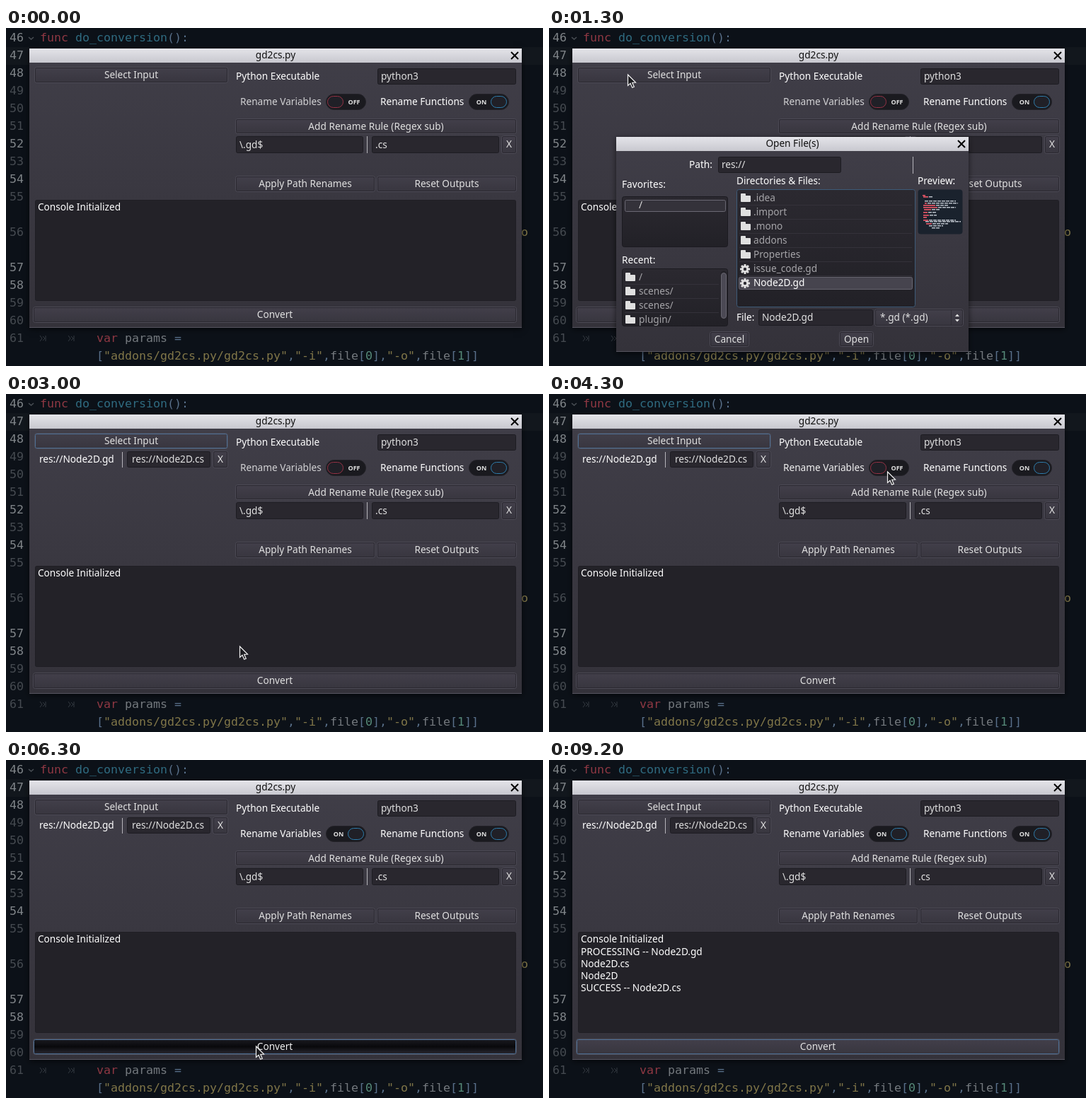
An HTML page with a canvas for the animation above (9.8 s loop, 759 px wide and 478 px high).

```html
<!DOCTYPE html>
<html lang="en">
<head>
<meta charset="utf-8">
<style>
html, body { margin: 0; width: 100%; height: 100%; overflow: hidden; background: #0c1118; }
canvas { display: block; }
</style>
</head>
<body>
<canvas id="stage" width="759" height="478"></canvas>
<script>
const ctx = document.getElementById('stage').getContext('2d');
const LOOP = 9800, STEP = 100;
const UI = '13.65px "Noto Sans", sans-serif';
const CODE = '16.61px "DejaVu Sans Mono", monospace';
const BLUE = '#4d6f94';
const WHITE = '#fff', LIGHT = '#e0e0e0', GREY = '#a5a4a8';

// Pointer keys: time, x, y. It is hidden outside the first and last key.
const PATH = [
  [600, 150, 4], [1000, 112, 66], [1500, 112, 66], [2300, 331, 357],
  [3300, 331, 357], [4300, 479, 110], [5000, 479, 110], [5200, 471, 133],
  [5300, 471, 133], [5600, 396, 317], [5700, 396, 317], [6000, 354, 405],
  [8800, 354, 405], [9100, 290, 70]
];
let pointer = null, modal = false;

function pointerAt(t) {
  const next = PATH.findIndex(key => key[0] >= t);
  if (next < 0 || t < PATH[0][0]) return null;
  const [t1, x1, y1] = PATH[next], [t0, x0, y0] = PATH[Math.max(0, next - 1)];
  const p = t1 > t0 ? (t - t0) / (t1 - t0) : 1;
  const e = p * p * (3 - 2 * p);
  return { x: Math.round(x0 + (x1 - x0) * e), y: Math.round(y0 + (y1 - y0) * e) };
}

const hovered = (x, y, w, h) => pointer && !modal &&
  pointer.x >= x && pointer.x < x + w && pointer.y >= y && pointer.y < y + h;

function text(str, x, middle, color = WHITE, align = 'left', font = UI) {
  ctx.font = font;
  ctx.textAlign = align;
  ctx.fillStyle = color;
  ctx.fillText(str, x, Math.round(middle + 5));
}

function rect(x, y, w, h, fill) {
  ctx.fillStyle = fill;
  ctx.fillRect(x, y, w, h);
}

function fade(y, h, ...colors) {
  const g = ctx.createLinearGradient(0, y, 0, y + h);
  colors.forEach((c, i) => g.addColorStop(i / (colors.length - 1), c));
  return g;
}

function box(x, y, w, h, fill, stroke, r = 2) {
  ctx.beginPath();
  ctx.roundRect(x + .5, y + .5, w - 1, h - 1, r);
  if (fill) { ctx.fillStyle = fill; ctx.fill(); }
  if (stroke) { ctx.strokeStyle = stroke; ctx.lineWidth = 1; ctx.stroke(); }
}

function lines(color, width, ...paths) {
  ctx.strokeStyle = color;
  ctx.lineWidth = width;
  ctx.beginPath();
  for (const path of paths)
    path.forEach(([x, y], i) => i ? ctx.lineTo(x, y) : ctx.moveTo(x, y));
  ctx.stroke();
}

function button(label, x, y, w, h, { focus, pressed } = {}) {
  const hover = hovered(x, y, w, h);
  const fill = pressed ? fade(y, h, '#1a1a20', '#09090c', '#2a2932')
    : hover ? fade(y, h, '#4e4c58', '#413f49') : fade(y, h, '#423f4a', '#38363f');
  box(x - 1, y - 1, w + 2, h + 2, null, '#4d4b56', 3);
  box(x, y, w, h, fill, focus ? BLUE : '#2a2830');
  text(label, x + w / 2, y + h / 2 - (h > 22 ? 1 : .5), hover ? '#f0f0f0' : LIGHT, 'center');
}

function field(str, x, y, w, h, pad = 5) {
  box(x, y, w, h, '#29272e', '#1d1c22');
  text(str, x + pad, y + h / 2 - .5, LIGHT);
}

function panel(x, y, w, h, stroke = '#1b1a20') {
  box(x, y, w, h, fade(y, h, '#2b2930', '#222127'), stroke, 3);
}

function toggle(x, on) {
  box(x, 93, 57, 23, '#1a1a1f', '#222127', 11);
  box(on ? x + 31 : x + 2, 96, 23, 17, '#202027', on ? '#2f7eae' : '#963245', 8);
  text(on ? 'ON' : 'OFF', on ? x + 18 : x + 40, 103, LIGHT, 'center', 'bold 9px "Noto Sans", sans-serif');
}

function frame(title, x, y, w, h) {
  ctx.save();
  ctx.shadowColor = 'rgba(0,0,0,.6)';
  ctx.shadowBlur = 8;
  ctx.shadowOffsetY = 2;
  rect(x, y, w, h, '#38363f');
  ctx.restore();
  rect(x, y, w, h, fade(y, h, '#403e48', '#3a3841', '#34323a'));
  rect(x, y + h - 1, w, 1, '#56545f');
  rect(x, y, w, 20, fade(y, 20, '#e4e4e9', '#c8c8cf'));
  text(title, x + w / 2, y + 9, '#111', 'center');
  const cx = x + w - 10, cy = y + 10;
  lines('#000', 2, [[cx - 5, cy - 5], [cx + 5, cy + 5]], [[cx + 5, cy - 5], [cx - 5, cy + 5]]);
}

function code(x, middle, ...parts) {
  for (const [str, color] of parts) {
    text(str, x, middle, color, 'left', CODE);
    x += str.length * 10;
  }
}

function editor() {
  const red = '#8f3843', plain = '#74797e', symbol = '#59708a', str = '#807648', num = '#568a78';
  rect(0, 0, 759, 478, '#0c1118');
  rect(0, 27, 759, 25, '#12171d');
  const bright = [46, 47, 48, 52, 54, 57, 58];
  for (let n = 46; n <= 61; n++) {
    const row = n - 46 + (n > 55) + (n > 56);
    code(5, 14 + row * 25, [String(n), bright.includes(n) ? '#7f8488' : '#454a50']);
  }
  lines('#4a4f55', 1.5, [[32, 13], [35.5, 16], [39, 13]]);
  code(48, 14, ['func ', red], ['do_conversion', '#2f6b80'], ['():', symbol]);
  code(728, 289, ['o', str]);
  for (const x of [48, 88])
    lines('#343a41', 1, [[x, 435], [x + 3, 439], [x, 443]], [[x + 4, 436], [x + 7, 439], [x + 4, 442]], [[x + 8, 435], [x + 8, 443]]);
  code(128, 439, ['var ', red], ['params ', plain], ['=', symbol]);
  code(128, 464, ['[', symbol], ['"addons/gd2cs.py/gd2cs.py"', str], [',', symbol], ['"-i"', str], [',', symbol],
    ['file', plain], ['[', symbol], ['0', num], ['],', symbol], ['"-o"', str], [',', symbol],
    ['file', plain], ['[', symbol], ['1', num], [']]', symbol]);
}

function converter(t) {
  const loaded = t >= 3000, renamed = t >= 4600, done = t >= 8000;
  frame('gd2cs.py', 33, 29, 696, 395);
  button('Select Input', 41, 56, 272, 21, { focus: t >= 3000 && t < 4500 });
  if (loaded) {
    text('res://Node2D.gd', 47, 92);
    rect(164, 82, 1, 22, '#b5b4ba');
    field('res://Node2D.cs', 171, 81, 118, 23, 7);
    button('X', 293, 81, 20, 23);
  }
  text('Python Executable', 325, 68);
  field('python3', 525, 57, 196, 23);
  const label = renamed ? WHITE : hovered(325, 85, 196, 39) ? '#f0f0f0' : '#d2d2d4';
  text('Rename Variables', 331, 104, label);
  toggle(452, renamed);
  if (t >= 4500 && t < 6200) box(325, 85, 196, 40, null, BLUE);
  text('Rename Functions', 529, 104);
  toggle(654, true);
  button('Add Rename Rule (Regex sub)', 325, 129, 396, 20);
  field('\\.gd$', 325, 153, 180, 24);
  rect(510, 153, 1, 24, '#b5b4ba');
  field('.cs', 517, 153, 180, 24);
  button('X', 701, 153, 20, 24);
  button('Apply Path Renames', 325, 210, 196, 21);
  button('Reset Outputs', 525, 210, 196, 21);
  box(41, 243, 680, 143, '#232228', '#1f1e24');
  text('Console Initialized', 45, 253);
  if (done) ['PROCESSING -- Node2D.gd', 'Node2D.cs', 'Node2D', 'SUCCESS -- Node2D.cs']
    .forEach((line, i) => text(line, 45, 271 + i * 17));
  button('Convert', 39, 395, 682, 21, { focus: t >= 6200, pressed: t >= 6300 && !done });
}

function folder(x, y) {
  ctx.fillStyle = LIGHT;
  ctx.beginPath();
  ctx.roundRect(x, y - 6, 7, 5, 1);
  ctx.roundRect(x, y - 3, 14, 9, 1);
  ctx.fill();
}

function gear(x, y) {
  for (let i = 0; i < 4; i++) {
    const dx = Math.cos(i * Math.PI / 4) * 7, dy = Math.sin(i * Math.PI / 4) * 7;
    lines(LIGHT, 3, [[x - dx, y - dy], [x + dx, y + dy]]);
  }
  ctx.beginPath();
  ctx.arc(x, y, 5, 0, 7);
  ctx.fillStyle = LIGHT;
  ctx.fill();
  ctx.beginPath();
  ctx.arc(x, y, 2.2, 0, 7);
  ctx.fillStyle = '#2b2a31';
  ctx.fill();
}

function preview() {
  box(521, 228, 64, 64, '#1a222d', null, 4);
  // Rows: y, indent, red length, pale length.
  const rows = [[236, 0, 4, 0], [238, 1, 7, 5], [244, 2, 0, 44], [247, 3, 3, 43], [250, 1, 17, 18],
    [253, 1, 20, 25], [256, 2, 10, 12], [260, 1, 6, 11], [264, 1, 8, 10], [267, 1, 5, 0],
    [271, 1, 7, 38], [273, 3, 0, 50], [276, 5, 8, 22], [279, 8, 0, 20], [282, 12, 0, 12]];
  for (const [y, indent, red, pale] of rows) {
    const x = 528 + indent;
    rect(x, y, red, 1.7, '#e25565');
    for (let d = 0; d < pale; d += 6)
      rect(x + red + 1 + d, y, Math.min(5, pale - d), 1.5, '#b9c0c9');
  }
}

function fileDialog() {
  frame('Open File(s)', 95, 154, 498, 304);
  text('Path:', 198, 193);
  field('res://', 239, 182, 174, 23);
  rect(514, 182, 1, 24, '#b5b4ba');
  text('Favorites:', 103, 221);
  text('Directories & Files:', 265, 216);
  text('Preview:', 521, 216);

  panel(103, 238, 150, 72);
  box(107, 243, 143, 17, '#34323a', '#6a6873');
  text('/', 127, 250, LIGHT);

  panel(265, 228, 253, 167, '#3e5b78');
  ['.idea', '.import', '.mono', 'addons', 'Properties', 'issue_code.gd', 'Node2D.gd'].forEach((name, i) => {
    const y = 240 + i * 20, chosen = i === 6;
    if (chosen) box(268, 352, 246, 18, '#46444e', '#66646f');
    else rect(269, y + 10, 244, 1, '#34323a');
    i < 5 ? folder(271, y) : gear(277, y + 1);
    text(name, 289, y, chosen ? WHITE : GREY);
  });
  preview();

  text('Recent:', 103, 328);
  panel(103, 340, 150, 82);
  ['/', 'scenes/', 'scenes/', 'plugin/'].forEach((name, i) => {
    const y = 352 + i * 20;
    if (i < 3) rect(107, y + 10, 133, 1, '#34323a');
    folder(108, y);
    text(name, 127, y, GREY);
  });
  box(242, 343, 10, 76, '#222127', null, 5);
  box(243, 346, 8, 65, '#4b4954', '#67656f', 4);

  text('File:', 265, 409);
  field('Node2D.gd', 296, 398, 162, 23);
  button('', 461, 398, 124, 23);
  text('*.gd (*.gd)', 468, 409, LIGHT);
  rect(568, 399, 1, 21, '#302e36');
  ctx.fillStyle = LIGHT;
  ctx.beginPath();
  for (const d of [-1, 1]) {
    ctx.moveTo(574, 410 + d * 2);
    ctx.lineTo(580, 410 + d * 2);
    ctx.lineTo(577, 410 + d * 5.5);
  }
  ctx.fill();
  button('Cancel', 228, 430, 54, 20);
  button('Open', 411, 430, 47, 20);
}

function drawPointer({ x, y }) {
  ctx.save();
  ctx.translate(x - .5, y);
  ctx.beginPath();
  for (const [px, py] of [[0, 0], [0, 15.5], [3.5, 12.3], [6.2, 18.3], [8.8, 17.2], [6.2, 11.3], [11, 11]])
    ctx.lineTo(px, py);
  ctx.closePath();
  ctx.fillStyle = '#1c1c20';
  ctx.strokeStyle = '#f2f2f2';
  ctx.lineWidth = 1.2;
  ctx.fill();
  ctx.stroke();
  ctx.restore();
}

function draw(now) {
  const t = Math.floor((now % LOOP) / STEP) * STEP;
  modal = t >= 1300 && t < 3000;
  pointer = pointerAt(t);
  editor();
  converter(t);
  if (modal) fileDialog();
  if (pointer) drawPointer(pointer);
  requestAnimationFrame(draw);
}

requestAnimationFrame(draw);
</script>
</body>
</html>
```
